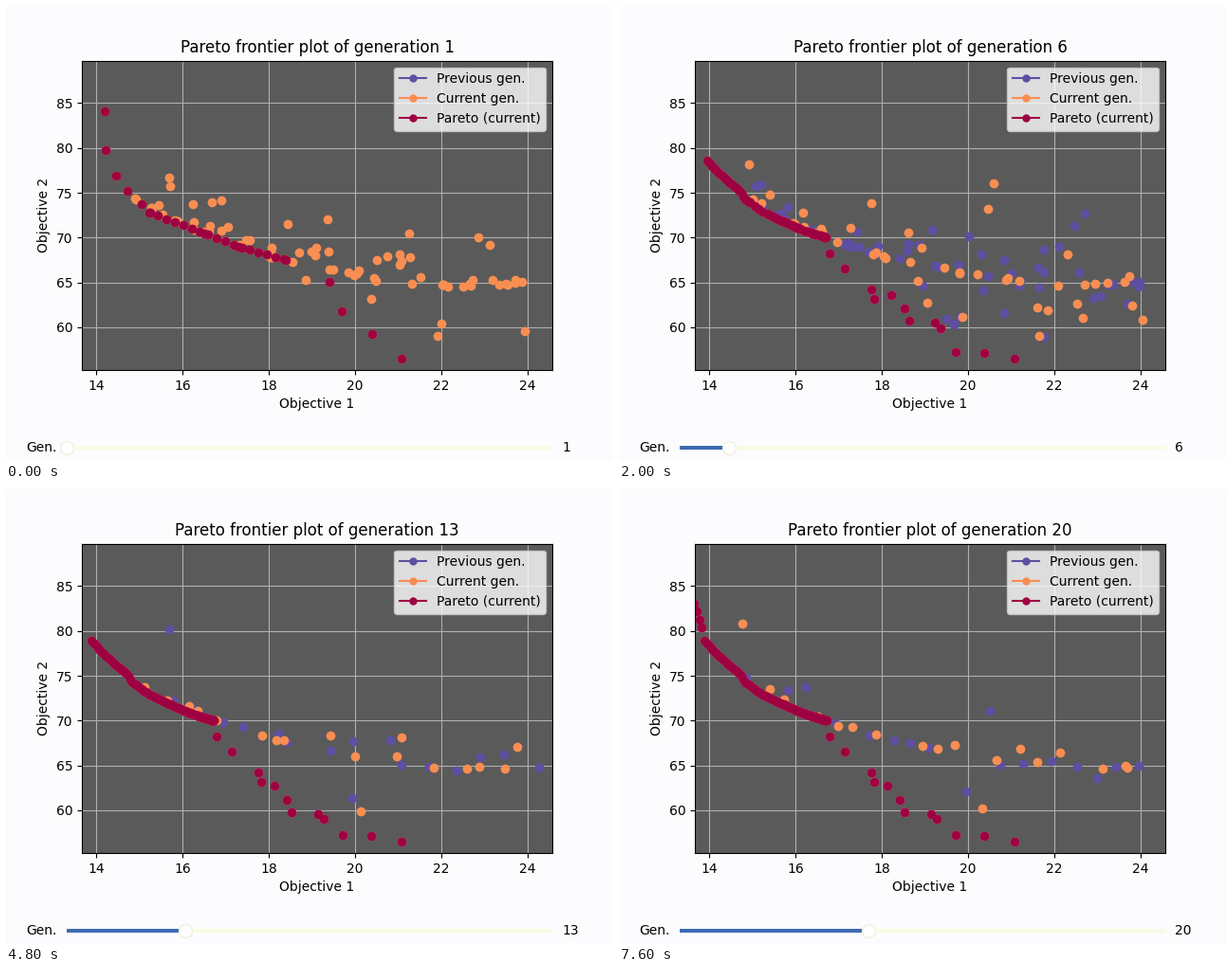
Recreate the animation shown at these times as a matplotlib script. Size 640 px wide and 480 px high, loop 8000 ms.

```python
import numpy as np
import matplotlib.pyplot as plt
from matplotlib.animation import FuncAnimation
from matplotlib.lines import Line2D
from matplotlib.patches import Rectangle

GENERATIONS, SLIDER_MAX = 20, 50
PREVIOUS, CURRENT, PARETO = "#5e4fa2", "#f98e52", "#9e0142"

# Key points (x, y) of the curves the solutions settle on.
START = np.array([(14.19, 84.1), (14.22, 79.8), (14.46, 76.9), (14.72, 75.2), (15.25, 72.8),
                  (16.5, 70.5), (17.3, 69), (18.4, 67.5), (19.4, 65.1), (19.69, 61.8),
                  (20.4, 59.3), (21.07, 56.5)])
BEST = np.array([(13.65, 83.1), (13.86, 80), (13.89, 79), (14.15, 77.5), (14.72, 75.2),
                 (14.8, 74.5), (15.1, 73.3), (15.56, 72.15), (16.19, 70.8), (16.72, 70)])
BAND = np.array([(14.8, 75), (15.2, 73.4), (16, 71.6), (17, 69.6), (18, 68), (19, 67),
                 (20, 65.9), (21, 65.1), (22, 64.7), (24.6, 64.8)])

# Isolated best solutions: x, y and the generation in which they settle.
TAIL = np.array([(16.79, 68.2, 3), (17.14, 66.6, 5), (17.75, 64.2, 3), (17.82, 63.2, 5),
                 (18.13, 62.7, 8), (18.43, 61.2, 8), (18.54, 59.8, 8), (19.14, 59.6, 10),
                 (19.27, 59, 8), (19.71, 57.2, 3), (20.37, 57.1, 3), (21.07, 56.5, 3)])
UNSETTLED_OFFSET = (0.1, 0.9)


def along(curve, xs):
    return np.column_stack([xs, np.interp(xs, *curve.T)])


# The main front fills up over time and is densest at its right end.
main_front = along(BEST, 16.72 - 2.83 * np.linspace(0, 1.052, 80) ** 1.6)
main_birth = np.random.default_rng(5).choice([3, 5, 7, 10], len(main_front), p=[.5, .3, .15, .05])
main_birth[main_front[:, 0] < 13.88] = 18


def front(g):
    if g < 3:
        return np.vstack([START, along(START, np.linspace(15.05, 18.35, 18))])
    tail = TAIL[:, :2] + np.outer(TAIL[:, 2] > g, UNSETTLED_OFFSET)
    return np.vstack([main_front[main_birth <= g], tail])


def crowd(g):
    """Dominated solutions: most on the band, some above it, a few below."""
    rng = np.random.default_rng(g)
    size = round(18 + 58 / (1 + np.exp((g - 6) / 0.9)))
    points = along(BAND, np.linspace(14.9, 24, size) + rng.uniform(-0.3, 0.3, size))
    x, y = points.T
    kind = rng.random(size)
    y += np.where(kind < 0.45, rng.exponential(2.2, size), rng.normal(0, 0.15, size))
    y -= np.where((kind > 0.8) & (x > 18.5), rng.uniform(1, 6, size), 0)
    return points.clip(max=82)


def population(g):
    return np.vstack([crowd(g), front(g)]) if g else np.empty((0, 2))


fig = plt.figure(figsize=(6.4, 4.8), dpi=100, facecolor="#fcfcfe")
ax = fig.add_axes([0.125, 0.2, 0.775, 0.68], facecolor="#5a5a5a")
ax.set(xlim=(13.673, 24.573), ylim=(55.24, 89.74), xlabel="Objective 1", ylabel="Objective 2")
ax.set_axisbelow(True)
ax.grid(True)
title = ax.set_title("")
previous, current, pareto = (ax.scatter([], [], color=c) for c in (PREVIOUS, CURRENT, PARETO))
ax.legend(handles=[Line2D([], [], color=c, marker="o", ms=5, label=label) for c, label in (
    (PREVIOUS, "Previous gen."), (CURRENT, "Current gen."), (PARETO, "Pareto (current)"))],
    loc="upper right", facecolor="white")

slider = fig.add_axes([0.1, 0.019, 0.8, 0.02])
slider.set(xlim=(1, SLIDER_MAX), ylim=(0, 1))
slider.axis("off")
slider.add_patch(Rectangle((1, 0.28), SLIDER_MAX - 1, 0.42, color="#fafae4", lw=0))
progress = slider.add_patch(Rectangle((1, 0.28), 0, 0.42, color="#3d6bb0", lw=0))
handle, = slider.plot([1], [0.5], "o", ms=10, mfc="white", mec="#f0f0dc", clip_on=False)
slider.text(-0.02, 0.5, "Gen.", transform=slider.transAxes, ha="right", va="center")
value = slider.text(1.02, 0.5, "", transform=slider.transAxes, ha="left", va="center")


def update(g):
    previous.set_offsets(population(g - 1))
    current.set_offsets(population(g))
    pareto.set_offsets(front(g))
    title.set_text(f"Pareto frontier plot of generation {g}")
    progress.set_width(g - 1)
    handle.set_xdata([g])
    value.set_text(str(g))
    return previous, current, pareto, title, progress, handle, value


animation = FuncAnimation(fig, update, frames=range(1, GENERATIONS + 1), interval=400,
                          repeat=True, repeat_delay=0)
plt.show()
```
